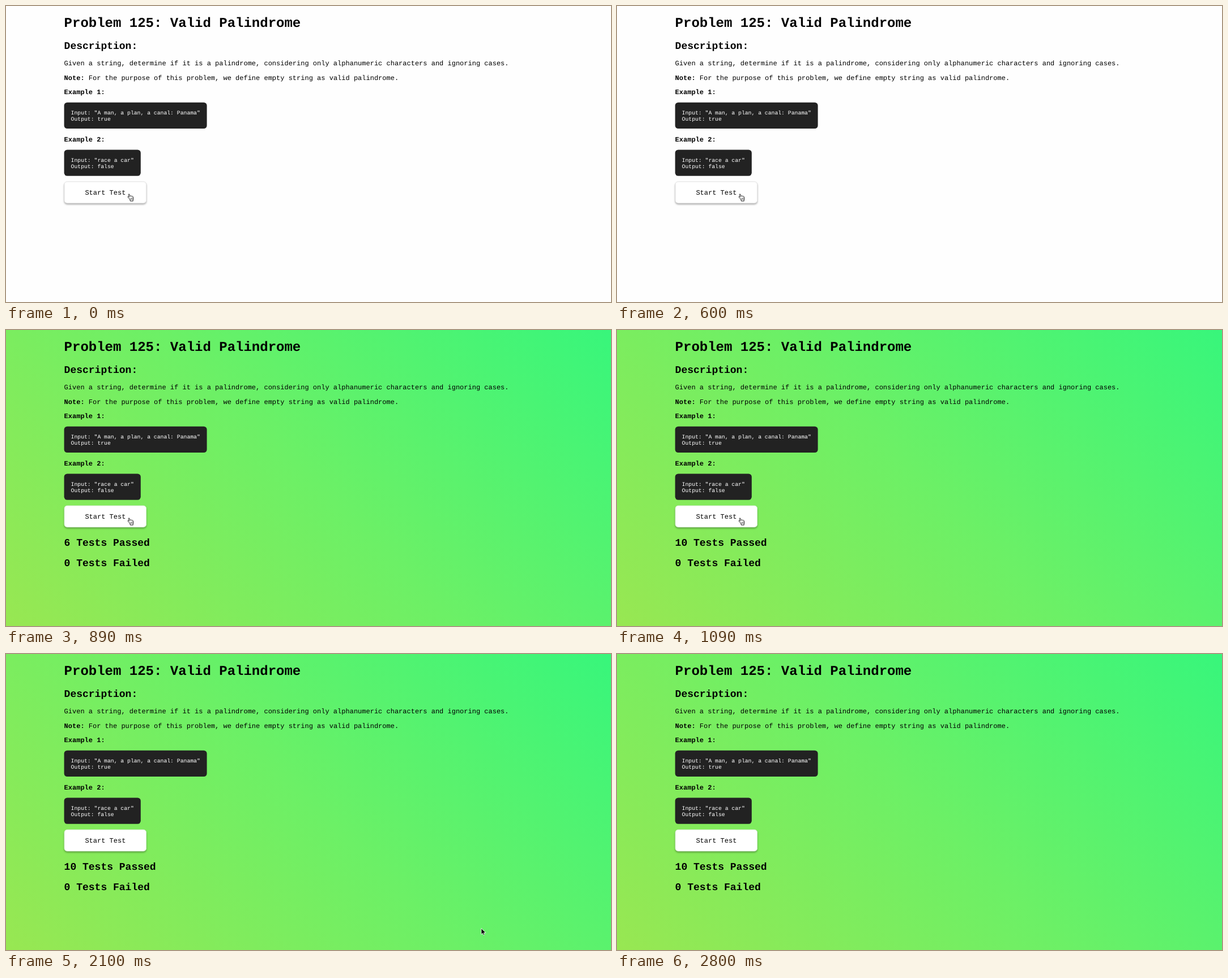
Write an HTML page that moves like this. It is 1068 px wide and 524 px high and loops after 3200 ms.

```html
<!DOCTYPE html>
<html lang="en">
<head>
<meta charset="utf-8">
<title>Valid Palindrome</title>
<style>
  html, body { margin: 0; width: 100%; height: 100%; overflow: hidden; background: #fefefe; }
  svg { display: block; width: 1068px; height: 524px; }
  text { font: 12px "Liberation Mono", "Courier New", monospace; text-rendering: geometricPrecision; }
  .bold { font-weight: 700; }
  .title { font-size: 24px; }
  .head { font-size: 18px; }
  .code { font-size: 9.75px; fill: #fff; }
  .block { fill: #222; }
  #button { filter: drop-shadow(0 2px 1.5px rgba(0, 0, 0, .32)); }
  .cursor { stroke-linejoin: round; stroke-linecap: round; }
</style>
</head>
<body>
<svg viewBox="0 0 1068 524">
  <defs>
    <linearGradient id="green" gradientUnits="userSpaceOnUse" x1="136" y1="660" x2="932" y2="-136">
      <stop offset="0" stop-color="#98e752"/>
      <stop offset=".5" stop-color="#6cf066"/>
      <stop offset="1" stop-color="#38f67b"/>
    </linearGradient>
  </defs>

  <rect id="page" width="1068" height="524" fill="#fefefe"/>

  <text class="bold title" x="102.6" y="36.5">Problem 125: Valid Palindrome</text>
  <text class="bold head" x="102.6" y="75.5">Description:</text>
  <text x="102.6" y="105">Given a string, determine if it is a palindrome, considering only alphanumeric characters and ignoring cases.</text>
  <text x="102.6" y="130.5"><tspan class="bold">Note:</tspan> For the purpose of this problem, we define empty string as valid palindrome.</text>

  <text class="bold" x="102.6" y="156">Example 1:</text>
  <rect class="block" x="102.6" y="170.7" width="252" height="46.3" rx="5.5"/>
  <text class="code" x="114.6" y="192">Input: "A man, a plan, a canal: Panama"</text>
  <text class="code" x="114.6" y="203.2">Output: true</text>

  <text class="bold" x="102.6" y="240">Example 2:</text>
  <rect class="block" x="102.6" y="254.5" width="135.2" height="46.3" rx="5.5"/>
  <text class="code" x="114.6" y="276">Input: "race a car"</text>
  <text class="code" x="114.6" y="287.2">Output: false</text>

  <rect id="button" x="103" y="311" width="144.6" height="38" rx="5" fill="#fff" stroke="#ddd" stroke-width=".8"/>
  <text x="139.4" y="334.3">Start Test</text>

  <g id="results">
    <text id="passed" class="bold head" x="102.6" y="382"></text>
    <text class="bold head" x="102.6" y="418">0 Tests Failed</text>
  </g>

  <g id="hand" class="cursor" transform="translate(214 332)">
    <path d="M3.7 9.1 L1.3 6.5 Q.7 5.6 1.5 5.2 Q2.3 4.9 3.6 6.2 L2.2 2.3 Q2 1.1 2.9 .9 Q3.7 .8 4.1 1.8 L5.2 4.7
      Q6.2 4 6.9 4.7 Q7.9 4 8.5 4.8 Q9.6 4.4 10.1 5.7 L10.8 8.4 Q11.1 10.1 10.2 11.2 L10.3 13.2 H5.3 L5 11.4 Z"
      fill="#fff" stroke="#111" stroke-width=".95"/>
    <path d="M5.7 8 L6.4 11 M7.4 7.8 L7.9 10.8 M9 7.6 L9.3 10.4" fill="none" stroke="#222" stroke-width=".6"/>
  </g>
  <path id="arrow" class="cursor" d="M.5 .5 V11 L3 8.7 L4.6 12.3 L6.4 11.5 L4.9 8 H8.2 Z"
    fill="#000" stroke="#fff" stroke-width=".8"/>
</svg>

<script>
const LOOP = 3200;
const PRESS = 390, RELEASE = 600, RESULT = 680, LEAVE = 1900;

// [start time, value], each held until the next
const COUNTS = [[680, 2], [770, 4], [880, 6], [980, 8], [1090, 10]];
const ARROWS = [
  [1900, [270, 329.5]], [2010, [590, 420]], [2100, [838.5, 485.5]],
  [2370, [880, 477]], [2450, [942, 476]], [2540, [994, 492]],
  [2620, [1029, 506]], [2700, [1050, 518]], [2800, null]
];

const el = id => document.getElementById(id);
const [page, button, results, passed, hand, arrow] =
  ["page", "button", "results", "passed", "hand", "arrow"].map(el);

function held(steps, t) {
  let value = null;
  for (const [start, v] of steps) if (t >= start) value = v;
  return value;
}

function show(node, on) {
  node.setAttribute("visibility", on ? "visible" : "hidden");
}

function draw(t) {
  const done = t >= RESULT;
  page.setAttribute("fill", done ? "url(#green)" : "#fefefe");
  button.setAttribute("fill", t >= PRESS && t < RELEASE ? "#f3f3f3" : "#fff");
  button.setAttribute("stroke", done ? "#d9eed6" : "#ddd");
  show(results, done);
  passed.textContent = done ? `${held(COUNTS, t)} Tests Passed` : "";

  const spot = held(ARROWS, t);
  show(hand, t < LEAVE);
  show(arrow, spot);
  if (spot) arrow.setAttribute("transform", `translate(${spot})`);
}

const began = performance.now();
function tick() {
  draw((performance.now() - began) % LOOP);
  requestAnimationFrame(tick);
}
tick();
</script>
</body>
</html>
```
